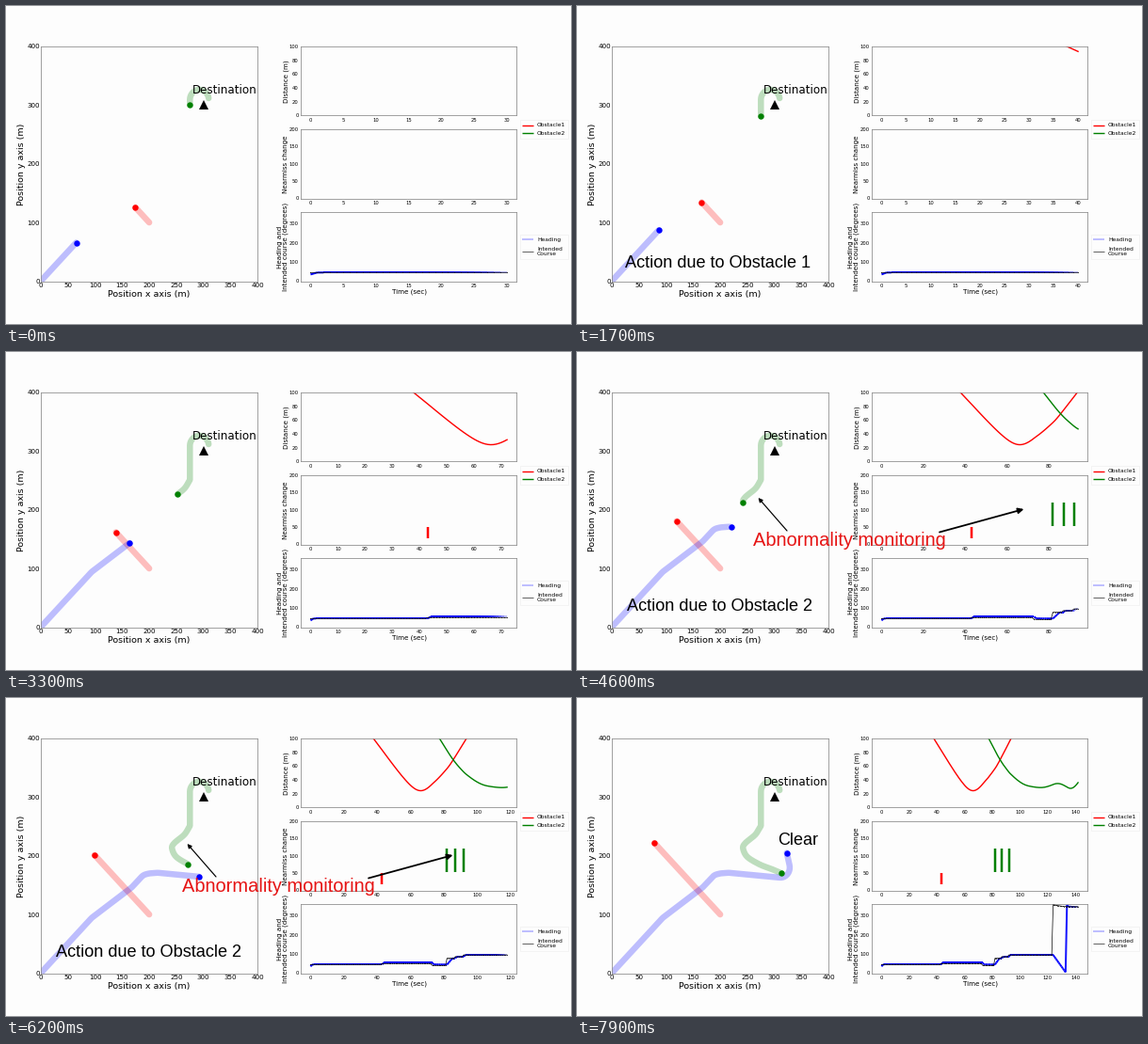
A matplotlib script that plays this animation: 600x338 px, repeating every 8000 ms.

```python
import numpy as np
import matplotlib.pyplot as plt
from matplotlib.animation import FuncAnimation
from matplotlib.collections import LineCollection
from matplotlib.patches import Rectangle

W, H, DPI = 600, 338, 100
PX = 72 / DPI  # points per pixel
FRAMES, INTERVAL = 80, 100
GREEN, GRAY, PAPER = "#008000", "#8c8c8c", "#fdfdfd"

plt.rcParams["font.family"] = "DejaVu Sans"
plt.rcParams["axes.facecolor"] = PAPER

# ---------- simulation, one sample per second ----------
END = 142
GOAL = np.array([300, 300])
SPEED, TURN = 3.0, 10  # metres and degrees per second
AVOID = [(43, 73, 50), (82, 87, 78), (87, 92, 86), (92, 124, 95)]  # start, stop, course
t = np.arange(END + 1)


def sail():
    """The ship steers for the goal, or for an avoiding course, at a limited turn rate."""
    pos, heading = np.array([1.5, 2.0]), 35.0
    log = []
    for s in t:
        course = np.degrees(np.arctan2(*(GOAL - pos)))
        for start, stop, avoiding in AVOID:
            if start <= s < stop:
                course = avoiding
        log.append((*pos, heading, course))
        drift = 5 if 43 <= s < 82 else 0
        turn = np.clip(course + drift - heading, -TURN, TURN)
        mid = np.radians(heading + turn / 2)
        pos = pos + SPEED * np.array([np.sin(mid), np.cos(mid)])
        heading += turn
    return np.array(log)


def smooth(x, xk, yk):
    """Cubic Hermite curve through the points (xk, yk)."""
    slope = np.gradient(yk, xk)
    i = np.clip(np.searchsorted(xk, x, side="right") - 1, 0, len(xk) - 2)
    step = xk[i + 1] - xk[i]
    u = (x - xk[i]) / step
    return ((1 + 2 * u) * (1 - u) ** 2 * yk[i] + u * (1 - u) ** 2 * step * slope[i]
            + u * u * (3 - 2 * u) * yk[i + 1] + u * u * (u - 1) * step * slope[i + 1])


def wander():
    """Half a turn, straight down, then a winding path through a few points."""
    angle = np.clip(np.pi * t / 26, 0.15, np.pi)
    x = 292.6 + 17.4 * np.cos(angle)
    y = 308.8 + 17 * np.sin(angle) - 2 * np.maximum(t - 26, 0)
    tk, xk, yk = np.array([
        (55, 275.2, 250.8), (63, 266, 237), (72, 252.6, 226.4), (80, 246.5, 221.5),
        (94, 242.2, 212), (106, 250, 198), (118, 271.8, 185.6),
        (132, 296.2, 176.8), (142, 312.7, 170.4)]).T
    late = t > 55
    return np.c_[np.where(late, smooth(t, tk, xk), x), np.where(late, smooth(t, tk, yk), y)]


log = sail()
ship, heading, course = log[:, :2], log[:, 2] % 360, log[:, 3] % 360
obst1 = np.c_[200 - 0.857 * t, 100 + 0.857 * t]
obst2 = wander()
dist1 = np.hypot(*(ship - obst1).T)
dist2 = np.hypot(*(ship - obst2).T)


def clock(frame):
    """Simulated second shown in a frame; it rests once and slows down later."""
    frames, seconds = zip((0, 30), (6, 39), (16, 39), (17, 40), (33, 72),
                          (46, 94), (62, 118), (79, END))
    return int(round(np.interp(frame, frames, seconds)))


# ---------- layout in stage pixels ----------
fig = plt.figure(figsize=(W / DPI, H / DPI), dpi=DPI, facecolor=PAPER)


def make_axes(x0, y0, x1, y1, size, pad_x, pad_y):
    ax = fig.add_axes([x0 / W, 1 - y1 / H, (x1 - x0) / W, (y1 - y0) / H])
    ax.tick_params(length=0, labelsize=size * PX)
    ax.tick_params(axis="x", pad=pad_x * PX)
    ax.tick_params(axis="y", pad=pad_y * PX)
    for spine in ax.spines.values():
        spine.set(linewidth=0.8 * PX, color=GRAY)
    return ax


plan = make_axes(37.2, 42.6, 267, 292.6, 7.2, 1.8, 1.3)
plan.set(xlim=(0, 400), ylim=(0, 400), xticks=range(0, 401, 50), yticks=range(0, 401, 100))

charts = [make_axes(313, top, 542.5, top + 73.5, 5.3, 2.7, 2.2) for top in (42.8, 131, 219)]
for ax, top, step in zip(charts, (100, 200, 360), (20, 50, 100)):
    ax.set(ylim=(0, top), yticks=range(0, top + 1, step))
dist_ax, near_ax, head_ax = charts

stage = fig.add_axes([0, 0, 1, 1], zorder=10)
stage.set(xlim=(0, W), ylim=(H, 0))
stage.axis("off")


def label(x, y, s, size, **kw):
    kw = {"ha": "center", "va": "center", **kw}
    return stage.text(x, y, s, fontsize=size * PX, **kw)


label(152, 306.5, "Position x axis (m)", 9.5)
label(17, 168, "Position y axis (m)", 9.5, rotation=90)
label(297.5, 80, "Distance (m)", 7.1, rotation=90)
label(297.5, 168, "Nearmiss change", 7.1, rotation=90)
label(294, 256, "Heading and\nIntended course (degrees)", 7.1, rotation=90,
      multialignment="center", linespacing=1.05)
label(428, 303.5, "Time (sec)", 7.1)
label(198, 93, "Destination", 11.85, ha="left", va="baseline")


# ---------- legends ----------
def legend_row(y, s, color, width):
    stage.plot([548, 560], [y, y], color=color, lw=width * PX, solid_capstyle="butt")
    label(564, y, s, 5.95, ha="left", va="center_baseline", linespacing=1.1)


for y, h in ((121, 20), (242.5, 26)):
    stage.add_patch(Rectangle((545.5, y), 51, h, fc=PAPER, ec="#eeeeee", lw=0.6 * PX))
legend_row(126.5, "Obstacle1", "red", 1.4)
legend_row(135, "Obstacle2", GREEN, 1.4)
legend_row(248, "Heading", "#bfbfff", 2)
legend_row(260.5, "Intended\nCourse", "black", 0.6)


# ---------- moving parts ----------
def line(ax, color, width, **kw):
    return ax.plot([], [], color=color, lw=width * PX, **kw)[0]


tracks = []
for path, color in ((obst1, "red"), (obst2, GREEN), (ship, "blue")):
    trail = line(plan, color, 6.5, alpha=0.25, solid_joinstyle="round",
                 solid_capstyle="round")
    dot = plan.plot([], [], "o", color=color, ms=6.4 * PX, mew=0, zorder=5)[0]
    tracks.append((path, trail, dot))
plan.plot(*GOAL, "k^", ms=9.5 * PX, mew=0, zorder=6)

curves = [(dist1, line(dist_ax, "red", 1.4)), (dist2, line(dist_ax, GREEN, 1.4))]

bars = []
for start, _, _ in AVOID:
    low, high, color = (18, 51, "red") if start < 82 else (54, 120, GREEN)
    bars.append((start, near_ax.plot([start, start], [low, high], color=color,
                                     lw=2.5 * PX, solid_capstyle="butt")[0]))

points = np.c_[t, heading]
pieces = np.stack([points[:-1], points[1:]], axis=1)
heading_line = LineCollection([], linewidths=2 * PX, zorder=2, capstyle="butt")
head_ax.add_collection(heading_line, autolim=False)
course_line = line(head_ax, "black", 0.7, marker=".", ms=1.5 * PX, mew=0, zorder=3)


# ---------- captions ----------
def caption(x, y, s, size, color="black"):
    return label(x, y, s, size, ha="left", va="baseline", color=color,
                 family="Liberation Sans")


def arrow(tip, tail, width, head):
    return stage.annotate("", tip, tail, arrowprops=dict(
        arrowstyle="-|>", color="black", lw=width * PX, shrinkA=0, shrinkB=0,
        mutation_scale=head * PX))


# first second, last second, parts
captions = [
    (39, 64, [caption(51, 278, "Action due to Obstacle 1", 18.2)]),
    (82, 124, [caption(53, 275, "Action due to Obstacle 2", 18.2),
               caption(187, 206.5, "Abnormality monitoring", 20, "#e61414"),
               arrow((192.5, 155), (223, 190), 1.2, 9),
               arrow((474.5, 167), (385, 191.5), 1.8, 12)]),
    (124, END + 1, [caption(213.5, 155.5, "Clear", 18)]),
]


def draw(frame):
    now = clock(frame)
    n = now + 1
    for path, trail, dot in tracks:
        trail.set_data(path[:n, 0], path[:n, 1])
        dot.set_data(path[now:n, 0], path[now:n, 1])
    for values, curve in curves:
        curve.set_data(t[:n], values[:n])
    for start, bar in bars:
        bar.set_visible(start <= now)

    # older pieces have been painted over more often and look denser
    rgba = np.zeros((now, 4))
    rgba[:, 2] = 1
    rgba[:, 3] = 1 - 0.75 ** (now - t[:now])
    heading_line.set_segments(pieces[:now])
    heading_line.set_color(rgba)
    course_line.set_data(t[:n], course[:n])

    span = 1.1 * now
    step = 5 if span <= 45 else 10 if span <= 90 else 20
    for ax in charts:
        ax.set_xticks(np.arange(0, 1.05 * now, step))
        ax.set_xlim(-0.05 * now, 1.05 * now)
    for start, stop, parts in captions:
        for part in parts:
            part.set_visible(start <= now < stop)
    return []


anim = FuncAnimation(fig, draw, frames=FRAMES, interval=INTERVAL, repeat=True,
                     repeat_delay=0, blit=False)
plt.show()
```
